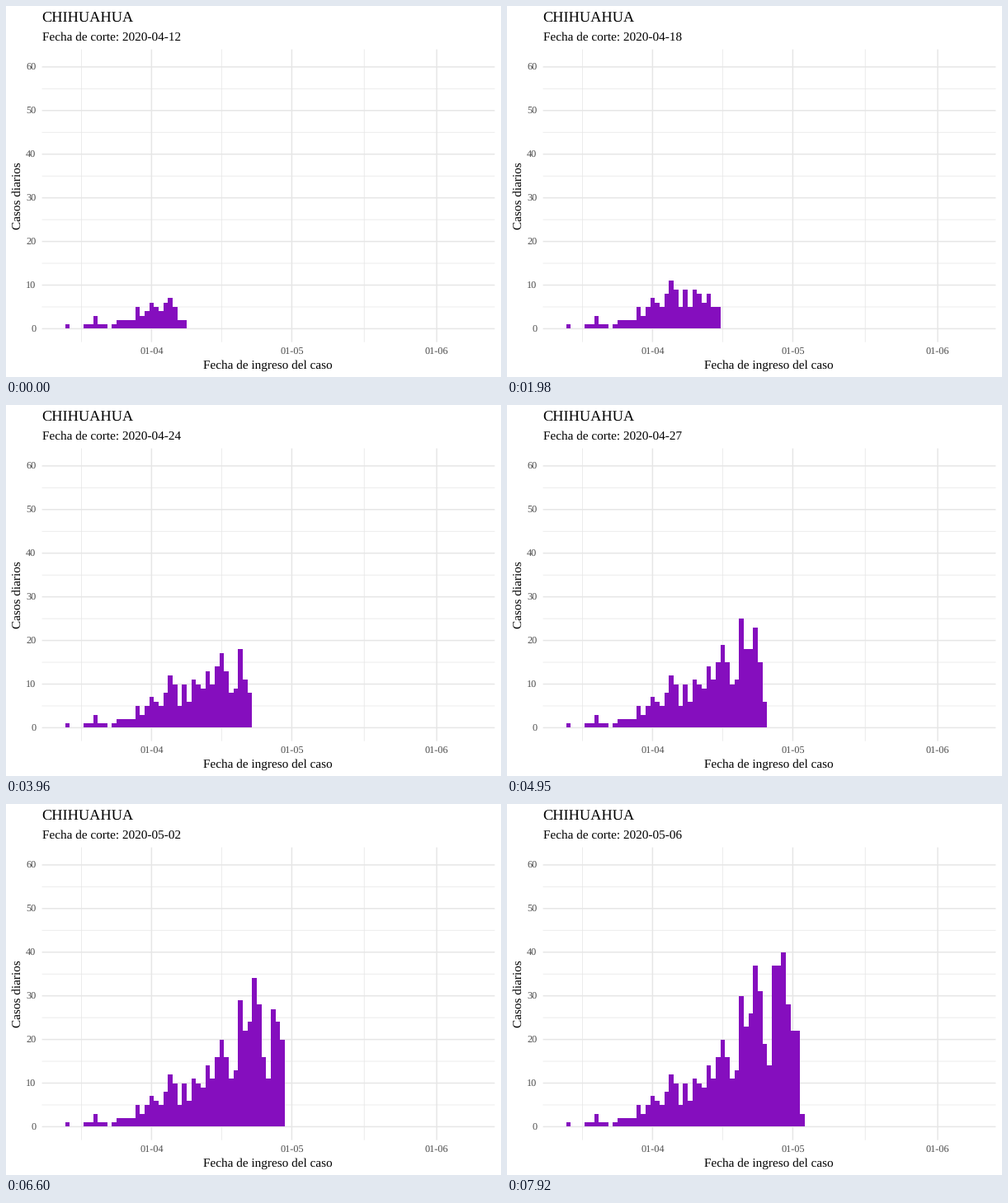
A matplotlib script that plays this animation: 600 by 450 pixels, repeating every 8 s.

```python
import numpy as np
import matplotlib.pyplot as plt
from matplotlib.animation import FuncAnimation

plt.rcParams["font.family"] = "Liberation Serif"
plt.rcParams["text.hinting"] = "none"

W, H, DPI = 600, 450, 100
LOOP, TICK, STEP = 8000, 40, 330          # ms
LAST = (LOOP - 1) // STEP                 # last cut-off date

# Panel geometry in pixels, y pointing down
LEFT, RIGHT, TOP, BOTTOM = 43.6, 592.4, 52.6, 407.6
ZERO, UNIT = 391.45, 5.293                # baseline and height of one case
APRIL, DAY = 176.4, 17 / 3                # 1 April and width of one day
FIRST = -18                               # first plotted day, from 1 April
PURPLE, GRID, TICK_TEXT = "#850EBE", "#E6E6E6", "#4D4D4D"

# Daily cases as known on the last cut-off date
TOTAL = np.array([1, 0, 0, 0, 1, 1, 3, 1, 1, 0, 1] + [2] * 4 + [
    5, 3, 5, 7, 6, 5, 8, 12, 10, 5, 10, 6, 11, 10, 9, 14, 11, 16, 20, 16,
    11, 13, 30, 23, 26, 37, 31, 19, 14, 37, 37, 40, 28, 22, 22, 3])
DAYS = np.arange(len(TOTAL))


def reported(step):
    """Share of each day's cases that has been reported by this step."""
    newest = 25 + step * 25 / LAST + 2 * np.sin(np.pi * step / LAST)
    age = newest - DAYS + 1e-9
    return np.where(age < 0, 0, 1 - 0.8 * np.exp(-np.maximum(age, 0) / 4))


def bar_tops(step):
    cases = np.rint(TOTAL * reported(step) / reported(LAST))
    return np.round(ZERO - UNIT * cases)


fig = plt.figure(figsize=(W / DPI, H / DPI), dpi=DPI, facecolor="white")
ax = fig.add_axes([0, 0, 1, 1])
ax.axis("off")


def label(x, y, text, size, color="black", **kw):
    return ax.text(x, y, text, fontsize=size, color=color, va="baseline",
                   rotation_mode="anchor", **kw)


def line(xs, ys, lw):
    ax.plot(xs, ys, color=GRID, lw=lw, snap=False, zorder=1,
            solid_capstyle="butt")


def hline(value, lw):
    y = ZERO - UNIT * value
    line([LEFT, RIGHT], [y, y], lw)
    return y


def vline(day, lw):
    x = APRIL + DAY * day
    line([x, x], [TOP, BOTTOM], lw)
    return x


MAJOR, MINOR = 1.07, 0.53
for v in range(5, 60, 10):
    hline(v, MINOR)
for d in (-15, 15, 45.5):
    vline(d, MINOR)
for v in range(0, 61, 10):
    label(36.4, hline(v, MAJOR) + 4.2, str(v), 8.8, TICK_TEXT, ha="right")
for d, month in ((0, 4), (30, 5), (61, 6)):
    label(vline(d, MAJOR), 423.3, f"01-{month:02d}", 8.8, TICK_TEXT,
          ha="center")

label(LEFT, 20.2, "CHIHUAHUA", 13.2)
subtitle = label(LEFT, 42, "", 11)
label((LEFT + RIGHT) / 2 - 0.4, 440, "Fecha de ingreso del caso", 11,
      ha="center")
label(18, (TOP + BOTTOM) / 2, "Casos diarios", 11, ha="center", rotation=90)

base = np.round(ZERO)
edges = np.round(APRIL + DAY * (FIRST - 0.5 + np.arange(len(TOTAL) + 1)))
bars = ax.stairs(bar_tops(0), edges, baseline=base, fill=True, color=PURPLE,
                 lw=0, antialiased=False, zorder=2)
ax.set_xlim(0, W)
ax.set_ylim(H, 0)


def update(frame):
    step = min((frame * TICK + TICK - 1) // STEP, LAST)
    bars.set_data(bar_tops(step), edges, base)
    cutoff = np.datetime64("2020-04-12") + step
    subtitle.set_text(f"Fecha de corte: {cutoff}")
    return bars, subtitle


anim = FuncAnimation(fig, update, frames=LOOP // TICK, interval=TICK,
                     init_func=lambda: update(0), repeat=True,
                     repeat_delay=0, blit=False)
plt.show()
```
